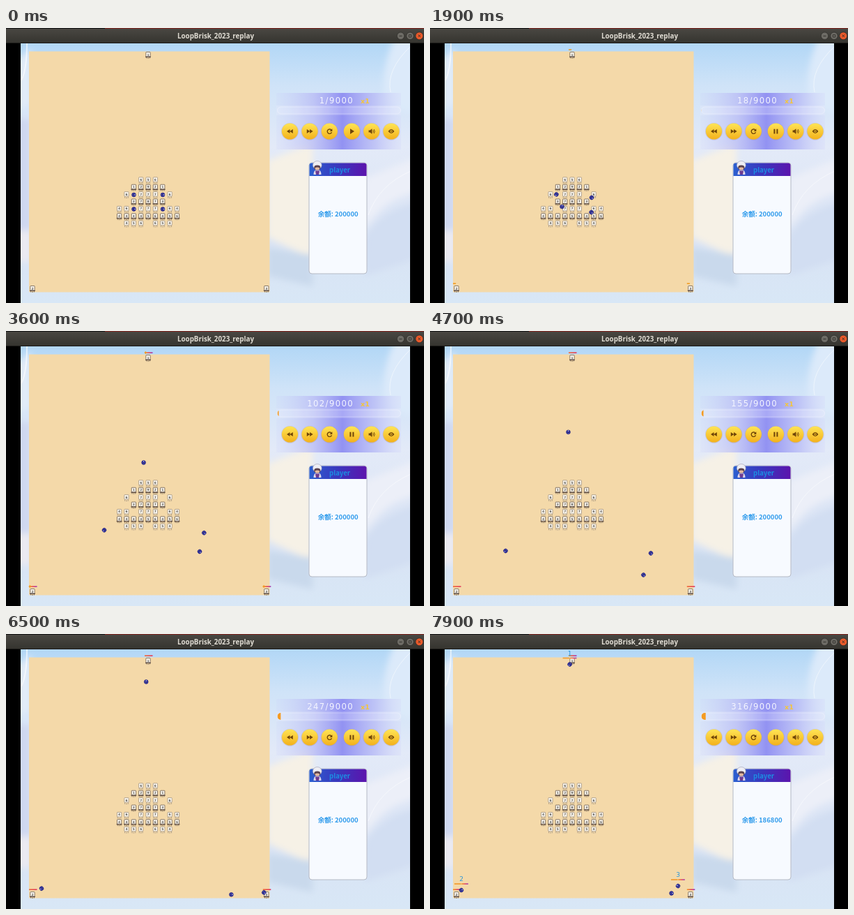
These frames come from a looping animation (600 px wide and 394 px high, 8000 ms). An HTML page:

```html
<!DOCTYPE html>
<html lang="zh">
<head>
<meta charset="utf-8">
<title>Replay</title>
<style>
html, body { margin: 0; width: 100%; height: 100%; overflow: hidden; background: #000; }
svg { display: block; width: 600px; height: 394px; }
text { font-family: "Noto Sans CJK SC", "Noto Sans", sans-serif; }
.title { font: bold 9.8px "Open Sans", "Noto Sans", sans-serif; fill: #dfdbd2; text-anchor: middle; }
.count { font: 11.6px "DejaVu Sans", sans-serif; letter-spacing: 1.4px; fill: #f4f5ff; text-anchor: end; }
.speed { font: bold 9.5px "DejaVu Sans", sans-serif; fill: #f3c53c; }
.name { font-weight: bold; font-size: 9.6px; fill: #1d8ee2; }
.money { font-weight: bold; font-size: 9.5px; fill: #2f9bec; text-anchor: middle; }
.tag { font: 9px "DejaVu Sans", sans-serif; fill: #2a97dc; text-anchor: middle; }
.num { font: bold 4.4px "DejaVu Sans", sans-serif; fill: #555; text-anchor: middle; }
.icon { fill: #6f4508; }
.line { fill: none; stroke: #6f4508; stroke-width: 1.4; }
</style>
</head>
<body>
<svg viewBox="0 0 600 394">
  <defs>
    <linearGradient id="sky" x2="0" y2="1">
      <stop stop-color="#b2d7f6"/><stop offset=".16" stop-color="#cfe3f8"/><stop offset=".4" stop-color="#e3eaf8"/>
      <stop offset=".75" stop-color="#d9e3f4"/><stop offset="1" stop-color="#d8e7f6"/>
    </linearGradient>
    <linearGradient id="panel">
      <stop stop-color="#c9cdf8" stop-opacity=".15"/><stop offset=".3" stop-color="#b9bcf5" stop-opacity=".8"/>
      <stop offset=".53" stop-color="#9292f2"/><stop offset=".8" stop-color="#bcc0f6" stop-opacity=".85"/>
      <stop offset="1" stop-color="#d5d9f9" stop-opacity=".35"/>
    </linearGradient>
    <linearGradient id="head">
      <stop stop-color="#2b5fd0"/><stop offset=".5" stop-color="#3a36bd"/><stop offset="1" stop-color="#5c14ad"/>
    </linearGradient>
    <linearGradient id="gold" x2="0" y2="1">
      <stop stop-color="#ffe556"/><stop offset="1" stop-color="#f3b11c"/>
    </linearGradient>
    <linearGradient id="bar" x2="0" y2="1"><stop stop-color="#4a4843"/><stop offset="1" stop-color="#35342f"/></linearGradient>
    <linearGradient id="warm"><stop stop-color="#f5a020"/><stop offset=".5" stop-color="#e8505a"/><stop offset="1" stop-color="#a03ab8"/></linearGradient>
    <linearGradient id="hot"><stop stop-color="#f0703a"/><stop offset="1" stop-color="#e23c62"/></linearGradient>
    <clipPath id="view"><rect x="21" y="22" width="559" height="372"/></clipPath>
    <clipPath id="pill"><rect x="389.5" y="113" width="177" height="10" rx="5"/></clipPath>
    <filter id="soft"><feGaussianBlur stdDeviation="5"/></filter>
  </defs>

  <rect width="600" height="394"/>
  <g clip-path="url(#view)">
    <rect x="21" y="22" width="559" height="372" fill="url(#sky)"/>
    <g filter="url(#soft)">
      <path d="M10 50L36 30V110L10 120Z" fill="#e2ecf8"/>
      <path d="M10 130H36V290H10Z" fill="#cfd8f0"/>
      <path d="M10 290H36V335H10Z" fill="#ebeaf1"/>
      <path d="M560 10Q535 60 545 110L590 125V10Z" fill="#dceafa"/>
      <path d="M375 190L440 165V330L375 300Z" fill="#f6f1e6"/>
      <path d="M375 315L440 325V370L375 355Z" fill="#c9d9ec"/>
      <path d="M590 185L515 215V290Q540 245 590 235Z" fill="#eceff8"/>
      <path d="M590 250Q540 260 515 300V355L590 330Z" fill="#d2def2"/>
    </g>
    <path d="M581 26Q545 60 552 92M581 205Q535 225 520 268" fill="none" stroke="#fff" stroke-opacity=".5"/>
    <path d="M22 75Q30 60 30 22" fill="none" stroke="#fff" stroke-opacity=".6" stroke-width="2"/>
  </g>
  <rect width="600" height="21.5" fill="url(#bar)"/>
  <rect width="600" height="1" fill="#121212"/>
  <rect x="142" width="458" height="1" fill="#7d241e"/>
  <text class="title" x="301" y="14.6">LoopBrisk_2023_replay</text>
  <g stroke="#2b2a27" stroke-width=".7">
    <circle cx="566.5" cy="11.3" r="5.2" fill="#6d6b65"/><circle cx="580" cy="11.3" r="5.2" fill="#6d6b65"/>
    <circle cx="593.3" cy="11.3" r="5.4" fill="#ea5a2a"/>
  </g>
  <path d="M564.5 11.5h4M578.3 9.7h3.4v3.4h-3.4zM591.6 9.6l3.4 3.4m0-3.4l-3.4 3.4" fill="none" stroke="#302e2a" stroke-width=".9"/>
  <rect x="33" y="33.5" width="345.5" height="345" fill="#f4d9a9"/>

  <rect x="388" y="93" width="179" height="81" fill="url(#panel)"/>
  <rect x="388" y="111" width="179" height="14" fill="#fff" opacity=".13"/>
  <rect x="389.5" y="113" width="177" height="10" rx="5" fill="#fff" fill-opacity=".08" stroke="#fff" stroke-opacity=".45" stroke-width=".7"/>
  <rect id="fill" x="389.5" y="113" height="10" fill="#f49b22" clip-path="url(#pill)"/>
  <text id="count" class="count" x="499" y="108">1/9000</text>
  <text class="speed" x="509" y="108.3">x1</text>
  <g id="buttons"></g>
  <g class="icon">
    <path d="M407.5 145.1v6l-4.5-3zM411.8 145.1v6l-4.5-3z"/>
    <path d="M431.8 145.1v6l4.5-3zM436.1 145.1v6l4.5-3z"/>
    <path class="line" d="M466.8 146A3.2 3.2 0 1 0 467.5 149.2"/><path d="M468.3 144.2v3.7h-3.7z"/>
    <path id="play" d="M494 144.3v7.6l6-3.8z"/>
    <path id="pause" d="M493.4 144.7h2v6.8h-2zM497.4 144.7h2v6.8h-2z"/>
    <path d="M520.6 146.6h2l2.8-2.4v7.8l-2.8-2.4h-2z"/>
    <path class="line" style="stroke-width:.9" d="M526.8 146.4q1.3 1.7 0 3.4M528.1 145q2.4 3.1 0 6.2"/>
    <path d="M548.6 148.1q4.4-6 8.8 0q-4.4 6-8.8 0z"/>
    <circle cx="553" cy="148.1" r="1.8" fill="#f8c732"/><circle cx="553" cy="148.1" r=".9"/>
  </g>

  <rect x="435" y="193" width="83" height="159" rx="4" fill="#f7faff" stroke="#b5b9c4"/>
  <path d="M435.5 212V197q0-3.5 3.5-3.5h75q3.5 0 3.5 3.5v15z" fill="url(#head)"/>
  <path d="M441.5 210q0-7 5.5-7t5.5 7z" fill="#ded8ea"/>
  <path d="M444 204.5h6l-1 5.5h-4z" fill="#6b3a92"/>
  <ellipse cx="446.8" cy="196.5" rx="6.4" ry="6" fill="#eeeef4" stroke="#9b9bb0" stroke-width=".6"/>
  <ellipse cx="446.8" cy="200" rx="4.6" ry="3.4" fill="#5c4450"/>
  <ellipse cx="446.8" cy="201.4" rx="3.2" ry="1.9" fill="#e3b99f"/>
  <text class="name" x="464" y="207.2">player</text>
  <text id="money" class="money" x="476.7" y="269.8"></text>

  <g id="benches"></g>
  <g id="robots"></g>
</svg>
<script>
const $ = id => document.getElementById(id);
function add(parent, tag, attrs, text) {
  const el = document.createElementNS("http://www.w3.org/2000/svg", tag);
  for (const k in attrs) el.setAttribute(k, attrs[k]);
  if (text) el.textContent = text;
  return parent.appendChild(el);
}

for (const x of [407.5, 436, 464.3, 496.4, 524.7, 553]) {
  add($("buttons"), "circle", { cx: x, cy: 148.3, r: 12.4, fill: "#a08c8c", opacity: .3 });
  add($("buttons"), "circle", { cx: x, cy: 148, r: 11.6, fill: "url(#gold)" });
}

function bench(x, y, digit, dark) {
  const g = add($("benches"), "g", { transform: `translate(${x} ${y})` });
  const ink = dark ? "#54453c" : "#95887a";
  add(g, "path", { d: "M-2.4 3v2.6M2.4 3v2.6M-1 5.2h2", stroke: ink, "stroke-width": .7 });
  add(g, "rect", { x: -3.1, y: -3.5, width: 6.2, height: 6.5, rx: .6, fill: "#fffaf0", stroke: ink, "stroke-width": .7 });
  if (dark) add(g, "path", { d: "M-4 3.4h8", stroke: "#4a3934", "stroke-width": 1 });
  add(g, "text", { class: "num", y: 1.5 }, digit);
}
const rows = ["   656   ", "  12921  ", " 6 777 6 ", "  37873  ", "46 777 64", "444456456", " 456 654 "];
rows.forEach((row, r) => [...row].forEach((d, c) => {
  if (d !== " ") bench(162.6 + c * 10.36, 217.4 + r * 10.38, d, r % 2);
}));

// Source benches: centre, frame of first purchase, price
const shops = [
  { x: 204, y: 38, sold: 281, price: 3000 },
  { x: 38, y: 373, sold: 264, price: 4400 },
  { x: 373.8, y: 373, sold: 250, price: 5800 }
];
shops.forEach((s, i) => {
  bench(s.x, s.y, i + 1, true);
  s.bar = add($("benches"), "rect", { x: s.x - 5, y: s.y - 7.7, height: 1.7 });
  s.star = add($("benches"), "path", { d: `M${s.x - 3.7} ${s.y - 9}v4M${s.x - 5.4} ${s.y - 7}h3.4`, stroke: "#f09a20" });
});

// Waypoints: [frame, x, y]
const paths = [
  [[1, 183.5, 259.5], [18, 189.5, 256], [67, 197, 217.5], [102, 197.6, 188.5], [155, 198.5, 144.8], [247, 201.2, 68.5], [281, 202.5, 41], [316, 200.6, 43.5]],
  [[1, 183.5, 239], [18, 181.4, 238.4], [42, 175, 253], [67, 162.6, 265.5], [102, 141, 285.3], [155, 108.5, 315], [247, 51, 364.6], [264, 40.5, 371], [298, 38.8, 370], [316, 45, 367]],
  [[1, 225, 239], [18, 232, 243], [67, 262.5, 269.5], [102, 284.3, 289.2], [155, 317, 318.4], [247, 370.3, 370.4], [252, 372.5, 372], [291, 372.5, 370], [316, 356, 361]],
  [[1, 225, 259.5], [18, 231.6, 264], [67, 258.6, 294], [102, 278, 316], [155, 306.4, 349.5], [190, 325.5, 373], [247, 323.4, 373.3], [316, 346.6, 371.5]]
];
const bots = paths.map((path, i) => {
  const g = add($("robots"), "g", {});
  const body = add(g, "g", {});
  add(body, "circle", { r: 2.9, fill: "#3434a4", stroke: "#23236e", "stroke-width": .6 });
  add(body, "path", { d: "M-1.6 0H2.6", stroke: "#b9bdea", "stroke-width": .9 });
  add(body, "circle", { cx: -.4, r: .9, fill: "#1c1c58" });
  const load = add(g, "g", {});
  if (i < 3) {
    add(load, "text", { class: "tag", y: -12.8 }, i + 1);
    add(load, "rect", { x: -10, y: -9.8, width: 9.6, height: 1.6, fill: "#f29a2a" });
    add(load, "rect", { x: .2, y: -9.8, width: 9.6, height: 1.6, fill: "url(#warm)" });
  }
  return { path, g, body, load };
});

function segment(keys, v) {
  let i = 0;
  while (i < keys.length - 2 && v >= keys[i + 1][0]) i++;
  const a = keys[i], b = keys[i + 1];
  return { a, b, k: Math.min(1, Math.max(0, (v - a[0]) / (b[0] - a[0]))) };
}
const mix = (a, b, k) => a + (b - a) * k;
const show = (el, on) => el.style.display = on ? "" : "none";

const clock = [[1500, 1], [1900, 18], [2900, 67], [3600, 102], [4700, 155], [6500, 247], [7900, 316]];

function draw(t) {
  const { a, b, k } = segment(clock, t);
  const n = Math.round(mix(a[1], b[1], k));
  $("count").textContent = n + "/9000";
  $("fill").setAttribute("width", n > 1 ? 177 * n / 9000 : 0);
  show($("play"), t < 1500);
  show($("pause"), t >= 1500);

  let money = 200000;
  for (const s of shops) {
    if (n >= s.sold) money -= s.price;
    const done = n >= 100 ? 1 : n > 1 ? n % 50 / 50 : 0;
    s.bar.setAttribute("width", 11.5 * done);
    s.bar.setAttribute("fill", n < 100 ? "#f2a02a" : n > 130 && n < s.sold ? "url(#hot)" : "url(#warm)");
    show(s.star, n >= 50 && n < 130);
  }
  $("money").textContent = "余额: " + money;

  bots.forEach((bot, i) => {
    const { a, b, k } = segment(bot.path, n);
    const e = a[0] === 1 ? k ** 1.5 : k;
    const x = mix(a[1], b[1], e), y = mix(a[2], b[2], e);
    const angle = n === 1 ? 0 : Math.atan2(b[2] - a[2], b[1] - a[1]) * 180 / Math.PI;
    bot.g.setAttribute("transform", `translate(${x} ${y})`);
    bot.body.setAttribute("transform", `rotate(${angle})`);
    show(bot.load, i < 3 && n >= shops[i].sold);
  });
}

function tick() {
  draw(Math.floor(performance.now() % 8000 / 100) * 100);
  requestAnimationFrame(tick);
}
tick();
</script>
</body>
</html>
```
